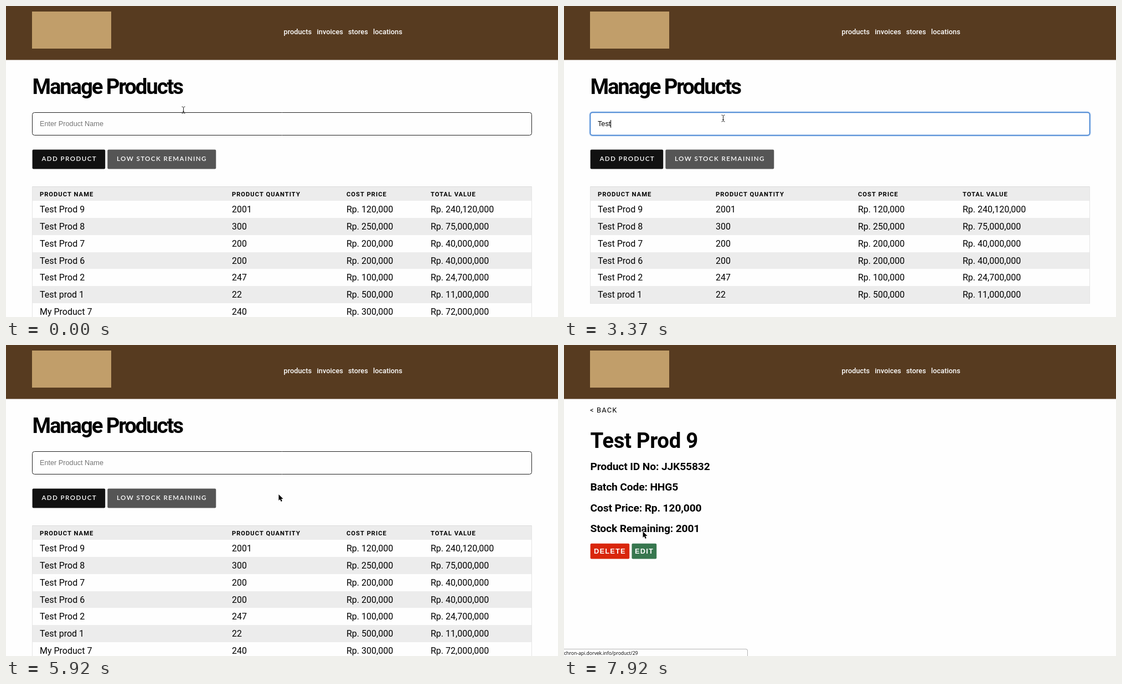
Write an HTML page with a canvas that moves like this. It is 997 px wide and 562 px high and loops after 8000 ms.

```html
<!DOCTYPE html>
<html lang="en">
<head>
<meta charset="utf-8">
<title>Manage Products</title>
<style>
html, body { margin: 0; width: 100%; height: 100%; overflow: hidden; background: #fefefe; }
canvas { display: block; width: 997px; height: 562px; }
</style>
</head>
<body>
<canvas id="stage" width="997" height="562"></canvas>
<script>
const LOOP = 8000;
const ctx = document.getElementById('stage').getContext('2d');
const ROBOTO = 'Roboto, sans-serif';
const ARIAL = '"Liberation Sans", Arial, sans-serif';

const products = [
  ['Test Prod 9', '2001', '120,000', '240,120,000'],
  ['Test Prod 8', '300', '250,000', '75,000,000'],
  ['Test Prod 7', '200', '200,000', '40,000,000'],
  ['Test Prod 6', '200', '200,000', '40,000,000'],
  ['Test Prod 2', '247', '100,000', '24,700,000'],
  ['Test prod 1', '22', '500,000', '11,000,000'],
  ['My Product 7', '240', '300,000', '72,000,000'],
  ['LANTERNFOLK Velvety Morning', '12', '22,000', '264,000']
];
const headings = ['PRODUCT NAME', 'PRODUCT QUANTITY', 'COST PRICE', 'TOTAL VALUE'];
const wideCols = [61, 408, 615, 767];
const narrowCols = [61, 274, 531, 720];

// [start, value] lists: the latest entry that has begun applies
const typing = [[0, ''], [2230, 'T'], [2680, 'Te'], [3070, 'Tes'], [3370, 'Test'],
  [4180, 'Tes'], [4710, 'Te'], [4800, 'T'], [4890, '']];
const caret = [[0, false], [770, true], [1250, false], [1790, true], [3820, false],
  [4180, true], [5390, false], [5830, true], [5920, false]];
const status = [[0, ''], [6800, 'chron-api.dorvek.info/product/29'],
  [6970, 'Waiting for chron-api.dorvek.info...'], [7060, 'chron-api.dorvek.info/product/29']];

// pointer moves: start, end, from, to
const moves = [
  [0, 90, [320, 188], [292, 185]],
  [240, 690, [292, 185], [287, 203]],
  [5190, 5280, [287, 203], [292, 210]],
  [5280, 5830, [292, 210], [492, 269]],
  [6000, 6890, [492, 269], [117, 366]],
  [7150, 7240, [117, 366], [115, 361]],
  [7830, 7920, [115, 361], [142, 336]]
];

const at = (list, t) => list.filter(e => t >= e[0]).pop()[1];
const ease = u => u * u * (3 - 2 * u);

function pointer(t) {
  let pos = moves[0][2];
  for (const [start, end, a, b] of moves) {
    if (t < start) break;
    const steps = Math.round((end - start) / 89);
    const u = ease(Math.min(1, Math.floor((t - start) / (end - start) * steps + 0.01) / steps));
    pos = a.map((v, i) => Math.round(v + (b[i] - v) * u));
  }
  return pos;
}

function rect(x, y, w, h, fill, r = 0) {
  ctx.fillStyle = fill;
  ctx.beginPath();
  ctx.roundRect(x, y, w, h, r);
  ctx.fill();
}

function outline(x, y, w, h, color, line = 1, r = 0) {
  ctx.strokeStyle = color;
  ctx.lineWidth = line;
  ctx.beginPath();
  ctx.roundRect(x, y, w, h, r);
  ctx.stroke();
}

function text(str, x, y, size, { weight = 400, color = '#000', space = 0, family = ROBOTO } = {}) {
  ctx.font = `${weight} ${size}px ${family}`;
  ctx.letterSpacing = space + 'px';
  ctx.fillStyle = color;
  ctx.fillText(str, x, y);
  return ctx.measureText(str).width;
}

function drawHeader() {
  rect(0, 0, 997, 562, '#fefefe');
  rect(0, 0, 997, 97.6, '#573b20');
  rect(47, 10, 143, 67, '#c19e6a');
  const links = { products: 501.5, invoices: 561.5, stores: 618, locations: 663 };
  for (const name in links) text(name, links[name], 51, 12.8, { weight: 500, color: '#fff' });
}

function drawInput(value, focused, caretOn) {
  if (focused) {
    outline(47.5, 192.5, 902, 41, '#dce9f9', 5, 4);
    outline(47.5, 192.5, 902, 41, '#9dbfea', 3, 4);
    rect(48, 193, 901, 40, '#fff', 3);
    outline(47.5, 192.5, 902, 41, '#3f7fd0', 1.5, 4);
  } else {
    outline(47.5, 192.5, 902, 41, '#222', 1, 4);
  }
  const style = { family: ARIAL, color: value ? '#000' : '#757575' };
  const width = text(value || 'Enter Product Name', 61, 217, 12.7, style);
  if (caretOn) rect(61 + Math.floor(value ? width : 0), 206, 1, 14, '#000');
}

function drawTable(query, hovered) {
  const rows = products.filter(p => p[0].includes(query)).slice(0, 7);
  const cols = rows.length < 7 ? narrowCols : wideCols;
  const step = 30.85;
  rect(47, 326, 902, 26, '#ececec');
  rect(47, 326, 902, 1, '#dadada');
  headings.forEach((h, i) => text(h, cols[i], 343.5, 11.2, { weight: 700, space: 1 }));
  rows.forEach((row, i) => {
    const top = Math.round(352 + i * step);
    if (i % 2) rect(47, top, 902, Math.round(352 + (i + 1) * step) - top, '#ececec');
    row.forEach((cell, c) => text((c > 1 ? 'Rp. ' : '') + cell, cols[c], top + 21, 16,
      { color: hovered && !i && !c ? '#555' : '#000' }));
  });
  const bottom = Math.min(562, 352 + rows.length * step);
  rect(47, 326, 1, bottom - 326, '#e4e4e4');
  rect(949, 326, 1, bottom - 326, '#e4e4e4');
  if (bottom < 562) rect(47, Math.round(bottom), 903, 1, '#e4e4e4');
}

function drawList(t) {
  const query = at(typing, t);
  text('Manage Products', 47.5, 159, 38.4, { weight: 700, space: -2.2 });
  drawInput(query, t >= 770 && t < 5920, at(caret, t));
  const label = { family: 'Lato, sans-serif', weight: 600, color: '#fff', space: 1.4 };
  rect(47.6, 259.6, 131.6, 35, '#111', 2);
  text('ADD PRODUCT', 64.5, 280, 11.6, label);
  rect(183.3, 259.6, 196, 35, '#555', 2);
  text('LOW STOCK REMAINING', 200, 280, 11.6, label);
  drawTable(query, t >= 6800);
  if (t >= 6970) {
    ctx.setLineDash([1, 1]);
    outline(60.5, 357.5, 81, 19, '#555');
    ctx.setLineDash([]);
  }
}

function drawDetail(loaded) {
  const lift = loaded ? 0 : 59;
  text('< BACK', 47, 122, 12.8, { space: 1.2 });
  if (loaded) text('Test Prod 9', 47.5, 186, 38.4, { weight: 700, space: -0.35 });
  const fields = [['Product ID No: ', 'JJK55832'], ['Batch Code: ', 'HHG5'],
    ['Cost Price: Rp. ', '120,000'], ['Stock Remaining: ', '2001']];
  fields.forEach(([name, value], i) => text(name + (loaded ? value : ''),
    47.5, 226 + i * 37.3 - lift, 19.2, { weight: 700, space: -0.12 }));
  const label = { family: ARIAL, weight: 700, color: '#fff', space: 1.2 };
  rect(47.6, 358.8, 70.6, 27.7, '#d9260a', 2);
  text('DELETE', 54, 377 - lift, 12.8, label);
  rect(122.4, 358.8 - lift, 44.8, 27.7, '#37774f', 2);
  text('EDIT', 128, 377 - lift, 12.8, label);
}

function drawStatus(str) {
  if (!str) return;
  rect(-4, 549, 336, 20, '#b4b4b4', 4);
  rect(-4, 550, 335, 20, '#fefefe', 3);
  text(str, 0, 559.5, 8.6, { family: '"Open Sans", sans-serif' });
}

function drawBeam(x, y) {
  ctx.strokeStyle = '#222';
  ctx.lineWidth = 1;
  ctx.beginPath();
  for (const s of [-1, 1]) {
    ctx.moveTo(x - 2.5, y + s * 6);
    ctx.quadraticCurveTo(x, y + s * 6, x + 0.5, y + s * 4.5);
    ctx.quadraticCurveTo(x + 1, y + s * 6, x + 3.5, y + s * 6);
  }
  ctx.moveTo(x + 0.5, y - 5);
  ctx.lineTo(x + 0.5, y + 5);
  ctx.moveTo(x - 1, y + 2.5);
  ctx.lineTo(x + 2, y + 2.5);
  ctx.stroke();
}

function drawArrow(x, y) {
  const shape = [[0, 0], [0, 11], [2.5, 8.8], [4.3, 13], [6.3, 12.1], [4.5, 8], [8, 8]];
  ctx.beginPath();
  shape.forEach(([dx, dy]) => ctx.lineTo(x + 0.5 + dx, y + 1 + dy));
  ctx.closePath();
  ctx.strokeStyle = '#fff';
  ctx.lineWidth = 1.6;
  ctx.stroke();
  ctx.fillStyle = '#000';
  ctx.fill();
}

function render(t) {
  drawHeader();
  if (t < 7060) drawList(t);
  else drawDetail(t >= 7390);
  drawStatus(at(status, t));
  const [x, y] = pointer(t);
  if (t < 5920 && y < 236) drawBeam(x, y);
  else drawArrow(x, y);
}

// "T" alone matches the long name, so it takes the last visible row
const begin = performance.now();
function tick() {
  render((performance.now() - begin) % LOOP);
  requestAnimationFrame(tick);
}
tick();
</script>
</body>
</html>
```
